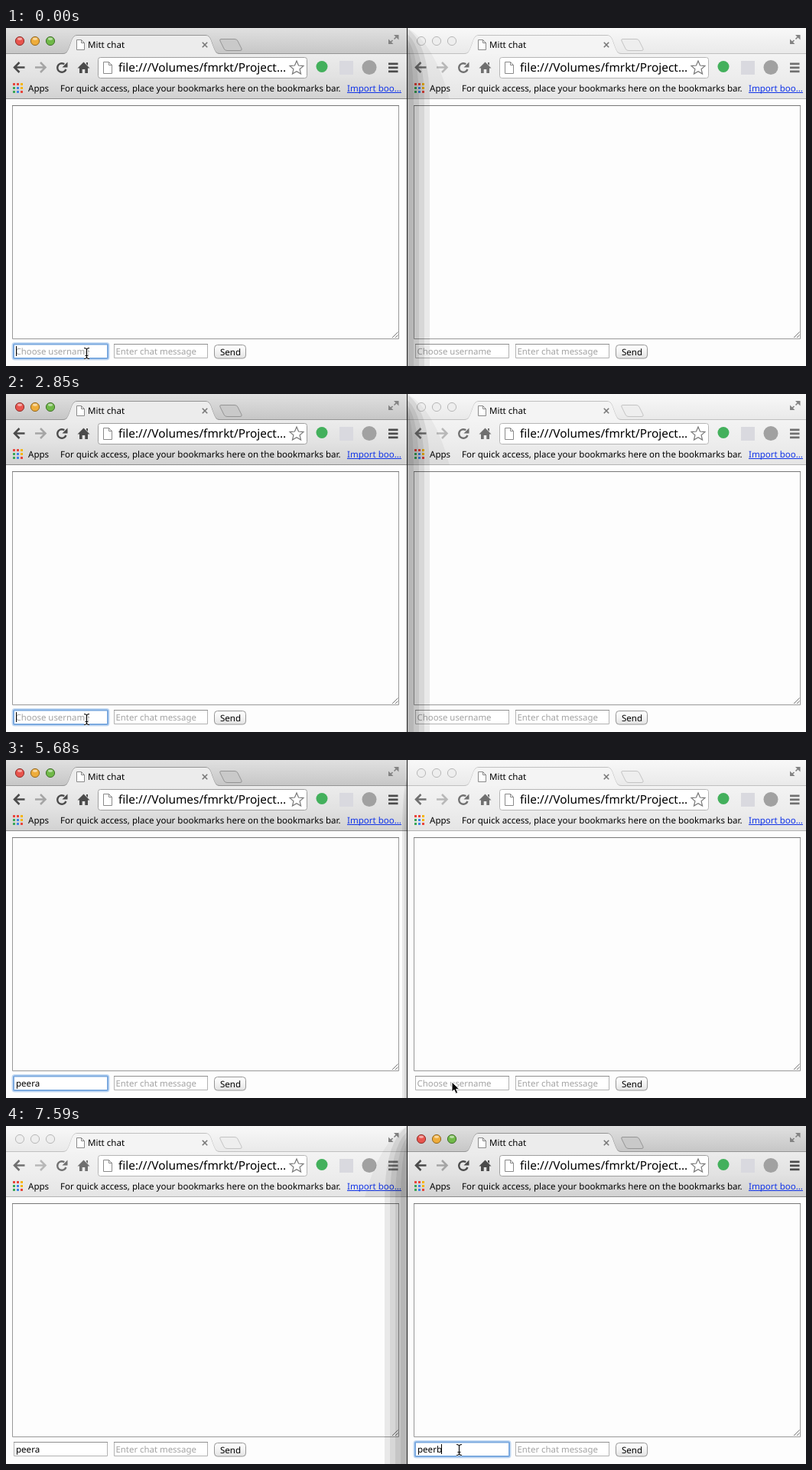
An HTML page with a canvas for the animation above (8000 ms loop, 1046 px wide and 442 px high).

```html
<!DOCTYPE html>
<html lang="en">
<head>
<meta charset="utf-8">
<title>Two chat windows</title>
<style>
  html, body { margin: 0; width: 100%; height: 100%; overflow: hidden; background: #fdfdfd; }
  canvas { display: block; width: 1046px; height: 442px; }
</style>
</head>
<body>
<canvas id="stage" width="1046" height="442"></canvas>
<script>
const ctx = document.getElementById('stage').getContext('2d');
const LOOP = 8000, RIGHT = 525;
const FONT = '"Noto Sans", "Open Sans", sans-serif';
ctx.textRendering = 'geometricPrecision';

// Each timeline lists [start time, value]; values hold until the next entry.
const leftName = [[0, ''], [1500, 'e'], [1650, 'ee'], [1800, 'eer'], [2550, 'ee'], [2700, 'e'], [2850, ''],
  [3600, 'p'], [3750, 'pe'], [3900, 'peer'], [4050, 'peera']];
const rightName = [[0, ''], [6850, 'p'], [7000, 'pe'], [7300, 'pee'], [7440, 'peer'], [7590, 'peerb']];
const caretOn = [[0, true], [300, false], [750, true], [1350, false], [1500, true], [2400, false], [2550, true],
  [3450, false], [3600, true], [4650, false], [5090, true], [5540, false], [6120, true], [6710, false], [6850, true]];
const pointer = [[0, [105, 425, 'beam']], [5240, [190, 424, 'beam']], [5390, [420, 423, 'arrow']],
  [5540, [562, 422, 'arrow']], [5680, [583, 421, 'arrow']], [5830, [583, 421, 'beam']], [5980, [592, 423, 'beam']]];
const valueAt = (steps, t) => steps.findLast(([start]) => t >= start)[1];

function rect(x, y, w, h, fill) {
  ctx.fillStyle = fill;
  ctx.fillRect(x, y, w, h);
}
function paint(path, fill, stroke, width = 1) {
  const shape = typeof path === 'string' ? new Path2D(path) : path;
  if (fill) { ctx.fillStyle = fill; ctx.fill(shape); }
  if (stroke) { ctx.strokeStyle = stroke; ctx.lineWidth = width; ctx.stroke(shape); }
}
function circle(x, y, r, fill, stroke) {
  const p = new Path2D();
  p.arc(x, y, r, 0, Math.PI * 2);
  paint(p, fill, stroke);
}
function rounded(x, y, w, h, r, fill, stroke, width) {
  const p = new Path2D();
  p.roundRect(x, y, w, h, r);
  paint(p, fill, stroke, width);
}
function vertical(y0, y1, ...colors) {
  const g = ctx.createLinearGradient(0, y0, 0, y1);
  colors.forEach((c, i) => g.addColorStop(i / (colors.length - 1), c));
  return g;
}
function text(str, x, y, color = '#000', size = 11.55, weight = 400) {
  ctx.font = `${weight} ${size}px ${FONT}`;
  ctx.fillStyle = color;
  ctx.fillText(str, x, y);
  return ctx.measureText(str).width;
}
function pageIcon(x, y, w, h) {
  paint(`M${x} ${y}h${w - 4}l4 4v${h - 4}h${-w}z M${x + w - 4} ${y}v4h4`, '#fff', '#8a8a8a');
}

function tabStrip(active) {
  rect(0, 0, 524, 34, active ? vertical(0, 34, '#e0e0e0', '#c6c6c6') : vertical(0, 34, '#f8f8f8', '#e9e9e9'));
  rect(0, 34, 524, 59, active ? vertical(34, 92, '#ececec', '#e2e2e2', '#d2d2d2') : vertical(34, 92, '#f3f3f3', '#ededed', '#e5e5e5'));
  const edge = active ? '#959595' : '#c0c0c0';
  paint('M0 33.5H74C80 33.5 81 30 84 22C87 13 88 9.5 94 9.5H260C266 9.5 267 13 270 22C273 30 274 33.5 280 33.5H524', null, edge);
  paint('M74 34.5C80 34 81 30 84 22C87 13 88 10 94 10H260C266 10 267 13 270 22C273 30 274 34 280 34.5z', active ? '#ececec' : '#f4f4f4');
  paint('M281 14.5H299Q302 14.5 303 17L308 27Q309 29.5 306 29.5H289Q286 29.5 285 27L280 17Q279 14.5 281 14.5z',
    active ? '#c9c9c9' : '#eeeeee', active ? '#959595' : '#c4c4c4');

  const lights = [['#e8544d', '#8f2f2b'], ['#eeac3a', '#94681f'], ['#70b948', '#41702c']];
  lights.forEach(([fill, rim], i) => {
    const x = 18 + i * 20;
    circle(x, 17, 5.6, active ? fill : '#eeeeee', active ? rim : '#b8b8b8');
    if (active) {
      ctx.fillStyle = 'rgba(255,255,255,.5)';
      ctx.beginPath();
      ctx.ellipse(x, 14.2, 3, 1.7, 0, 0, Math.PI * 2);
      ctx.fill();
    }
  });
  pageIcon(92.5, 15.5, 10, 13);
  text('Mitt chat', 107, 26);
  paint('M256.8 18.8l6.4 6.4M263.2 18.8l-6.4 6.4', null, '#777', 1.6);
  const arrows = '#838383';
  paint('M507 9h6.5v6.5zM500 14.5v6.5h6.5z', arrows);
  paint('M507.5 14.5l3.5-3.5M505.5 16l-3.5 3.5', null, arrows, 1.6);
}

function toolbar(active) {
  const dark = active ? '#4b4b4b' : '#707070';
  paint('M24.5 51.5H11.5M17.5 45l-6.5 6.5 6.5 6.5', null, dark, 2.5);
  paint('M38 51.5H51M45 45l6.5 6.5-6.5 6.5', null, active ? '#a5a5a5' : '#b8b8b8', 2.5);
  const loop = new Path2D();
  loop.arc(73, 52, 5.8, 0.35, 5.3);
  paint(loop, null, dark, 2.4);
  paint('M80.5 44.5v7h-7z', dark);
  paint('M93.5 52.5L101.5 44.5 109.5 52.5H107V59H103.3V54H99.7V59H96V52.5z M105 45h2v4l-2-2z', dark);

  rounded(120.5, 38.5, 273, 27, 3, '#fff', active ? '#9f9f9f' : '#b5b5b5');
  pageIcon(127.5, 44.5, 11, 15);
  text('file:///Volumes/fmrkt/Project…', 147, 57, '#000', 15.4);
  const star = new Path2D();
  for (let i = 0; i < 10; i++) {
    const a = i * Math.PI / 5 - Math.PI / 2, r = i % 2 ? 4.3 : 9.4;
    star.lineTo(380 + r * Math.cos(a), 52.5 + r * Math.sin(a));
  }
  star.closePath();
  paint(star, '#fff', '#777', 1.2);

  circle(413, 50.5, 7.5, '#43b05c');
  rect(436, 43, 18, 18, '#d9d9df');
  circle(475, 51.5, 9.5, '#a1a1a1');
  for (const y of [45.5, 50.5, 55.5]) rect(500, y, 12.5, 2.7, dark);

  const red = '#e8453c', green = '#3aa757', blue = '#4285e8', yellow = '#f5b400';
  [red, red, yellow, green, blue, yellow, green, blue, red].forEach((color, i) =>
    rect(9 + i % 3 * 5, 72 + Math.floor(i / 3) * 5, 3, 3, color));
  text('Apps', 29, 83);
  text('For quick access, place your bookmarks here on the bookmarks bar.', 71, 83);
  const linkWidth = text('Import boo…', 446, 83, '#1134e8');
  rect(446, 84, linkWidth, 1, '#1134e8');
  rect(0, 92, 524, 1, active ? '#8c8c8c' : '#b4b4b4');
}

function field(x, value, placeholder, focused, caret) {
  if (focused) {
    rounded(x - 0.5, 413, 124, 19.5, 2, null, '#c4daf3', 4);
    rounded(x, 413.5, 123, 18.5, 1, '#fff', '#7ba9df', 2);
  } else {
    rounded(x + 0.5, 413.5, 122, 18, 0, '#fff', '#b2b2b2');
    rect(x, 413, 123, 1, '#8f8f8f');
  }
  const width = value ? text(value, x + 3, 427) : text(placeholder, x + 2.5, 427, '#a3a3a3', 11.4, 500);
  if (focused && caret) rect(Math.floor(x + 3 + (value ? width - 0.5 : 0)), 416, 1, 13, '#000');
}

function page(name, focused, caret) {
  rect(0, 93, 524, 349, '#fdfdfd');
  rounded(8.5, 101.5, 505, 305, 0, '#fdfdfd', '#999');
  rect(8, 101, 506, 1, '#777');
  paint('M505 405l7.5-7.5M509 405l3.5-3.5', null, '#777');
  field(10, name, 'Choose username', focused, caret);
  field(141, '', 'Enter chat message', false, false);
  rounded(272.5, 414.5, 41, 17.5, 4, vertical(414, 432, '#fff', '#f4f4f4', '#e3e3e3'), '#969696');
  text('Send', 280, 428);
}

function browser(x, active, name, focused, caret) {
  ctx.save();
  ctx.translate(x, 0);
  tabStrip(active);
  toolbar(active);
  page(name, focused, caret);
  ctx.restore();
}

// Banded shadow that the front window casts sideways over its neighbour.
function shadow(x, dir, widths) {
  for (const w of widths) {
    const far = x + dir * w;
    paint(`M${x} ${30 - w}Q${far} ${50 - w} ${far} 100V442H${x}z`, 'rgba(0,0,0,.08)');
  }
}
function wideShadow(x, dir) {
  shadow(x, dir, [29, 22, 15, 8]);
  paint(`M${x} 0Q${x + dir * 35} 20 ${x + dir * 55} 93H${x}z`, 'rgba(0,0,0,.045)');
}

function cursor([x, y, kind]) {
  ctx.save();
  ctx.translate(x, y);
  if (kind === 'beam') {
    const beam = 'M-3 -6.5Q0.5 -6.5 0.5 -4Q0.5 -6.5 4 -6.5M0.5 -4.5V5.5M-3 7.5Q0.5 7.5 0.5 5Q0.5 7.5 4 7.5M-1.5 3.5H2.5';
    paint(beam, null, 'rgba(255,255,255,.8)', 2.6);
    paint(beam, null, '#000', 1.1);
  } else {
    paint('M0 0V13L3 10.3 5.2 15.3 7.8 14.2 5.6 9.4H9.8z', '#000', '#fff', 1);
  }
  ctx.restore();
}

function draw(now) {
  const t = now % LOOP;
  const rightActive = t >= 5830;
  const caret = valueAt(caretOn, t);
  browser(0, !rightActive, valueAt(leftName, t), !rightActive, caret);
  browser(RIGHT, rightActive, valueAt(rightName, t), t >= 6120, caret);
  // The right window comes to the front just before it takes on its active colours.
  if (rightActive) wideShadow(524, -1);
  else if (t < 5680) wideShadow(RIGHT, 1);
  else shadow(524, -1, [6, 3]);
  rect(524, 0, 1, 442, '#1c1c1c');
  cursor(valueAt(pointer, t));
  requestAnimationFrame(draw);
}
requestAnimationFrame(draw);
</script>
</body>
</html>
```
